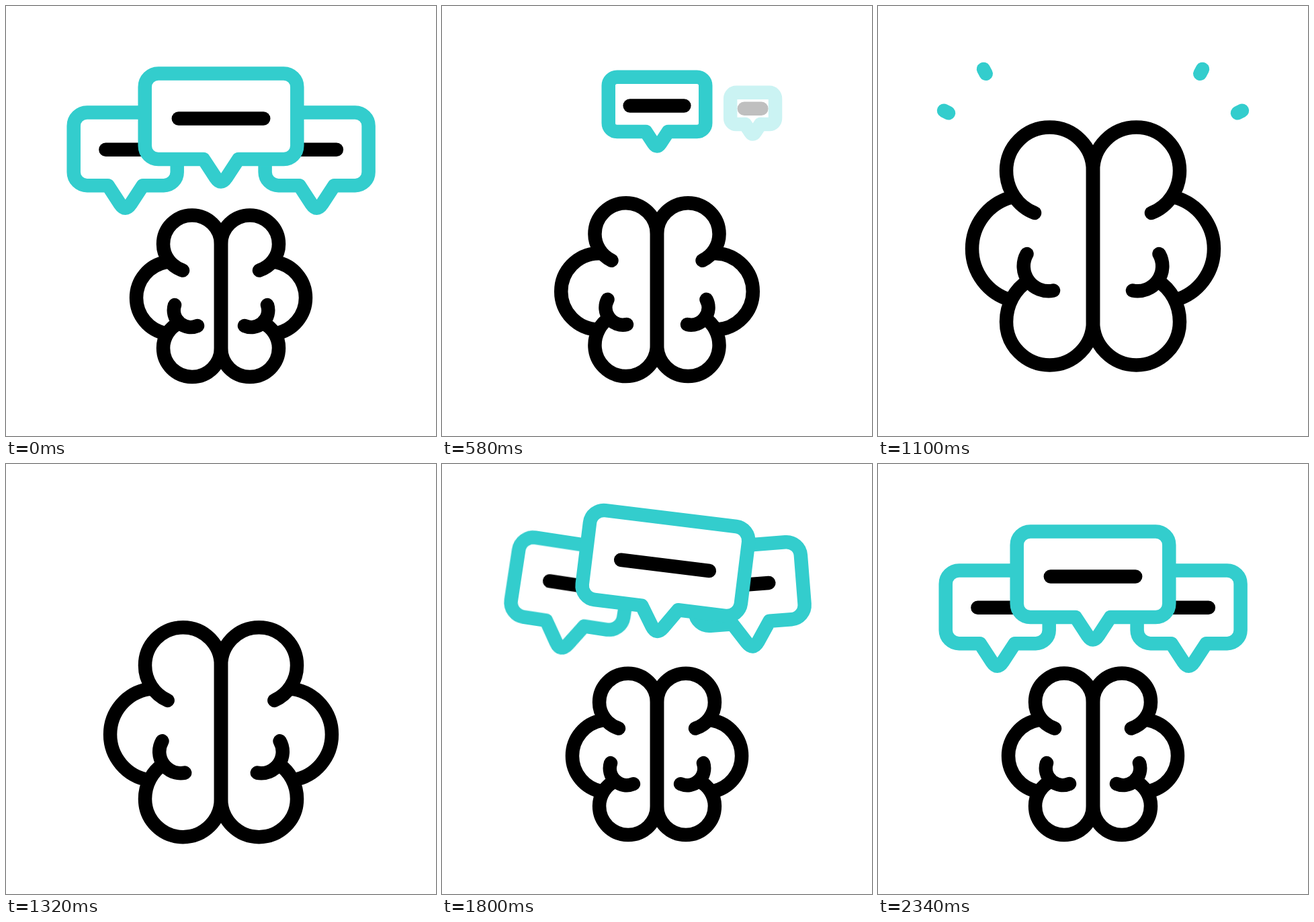
An HTML page that plays this animation: 640 by 640 pixels, repeating every 2.62 s.

```html
<!DOCTYPE html>
<html lang="en">
<head>
<meta charset="utf-8">
<title>Brain and speech bubbles</title>
<style>
  html, body { margin: 0; width: 100%; height: 100%; overflow: hidden; background: #fff; }
  svg { display: block; width: 100vw; height: 100vh; }
  path { fill: none; stroke: #000; stroke-width: 20.5; stroke-linecap: round; stroke-linejoin: round; vector-effect: non-scaling-stroke; }
  .teal { stroke: #33cdcd; }
  .box { fill: #fff; }
</style>
</head>
<body>
<svg viewBox="0 0 640 640">
  <defs>
    <path id="half"/>
    <g id="burst"><path class="teal"/><path class="teal"/></g>
  </defs>
  <use href="#half"/>
  <use href="#half" transform="matrix(-1 0 0 1 640 0)"/>
  <g id="rays">
    <use href="#burst"/>
    <use href="#burst" transform="matrix(-1 0 0 1 640 0)"/>
  </g>
  <g id="bubbles"></g>
</svg>
<script>
const LOOP = 2620, STEP = 20;
const $ = id => document.getElementById(id);
const clamp = x => Math.min(1, Math.max(0, x));

// Eased step from 0 to 1, and a smooth bump of height 1.
const ramp = (t, from, to) => {
  const u = clamp((t - from) / (to - from));
  return u * u * (3 - 2 * u);
};
const bump = (t, at, width) => Math.cos(Math.PI / 2 * Math.min(1, Math.abs(t - at) / width)) ** 2;

function drawBrain(t) {
  const drop = bump(t, 420, 200) + 1.2 * bump(t, 1400, 200) + 0.3 * bump(t, 2020, 200);
  const bulge = bump(t, 520, 240) + bump(t, 1440, 240) + 0.9 * bump(t, 2020, 240);
  const size = ramp(t, 450, 860) - ramp(t, 1180, 1550) - 0.1 * bulge;
  const mix = (small, large) => small + (large - small) * size;

  const bottom = mix(552, 534.5) + 18 * drop;
  const top = bottom - mix(240.5, 354);
  const r = mix(43, 64.5), cx = 320 - r, left = cx - r;
  const upper = top + r, lower = bottom - r;

  // end of the top lobe, start and end of the inner fold
  const ex = 320 - mix(57, 87) - 7 * bulge, ey = top + mix(82, 127.5) - 4 * bulge;
  const ax = 320 - mix(69, 98.5), ay = top + mix(133.5, 188.5) + 2 * bulge;
  const bx = 320 - mix(35, 59) - 7.5 * bulge, by = top + mix(164.5, 243) + 5 * bulge;

  // the bottom lobe meets the fold at its middle
  const dx = bx - ax, dy = by - ay, fold = 0.55 * Math.hypot(dx, dy);
  const jx = (ax + bx) / 2 - 0.321 * dy, jy = (ay + by) / 2 + 0.321 * dx;

  // side lobe: a circle through both joints and the outermost point
  const side = 320 - mix(126, 180) - 10 * bulge;
  const sx = cx - 0.9 * r, sy = upper + 0.62 * r, ty = lower - 0.5 * r;
  const w = sx - side, h = (ty - sy) / 2, R = (w * w + h * h) / (2 * w);

  // vertical radius of an ellipse around (cx, cy) that passes through (x, y)
  const reach = (x, y, cy) => Math.abs(y - cy) / Math.sqrt(1 - ((x - cx) / r) ** 2);

  $('half').setAttribute('d', `M320 ${lower}V${upper}A${r} ${r} 0 0 0 ${left} ${upper}`
    + `A${r} ${reach(ex, ey, upper)} 0 0 0 ${ex} ${ey}`
    + `M${sx} ${sy}A${R} ${R} 0 ${w > R ? 1 : 0} 0 ${sx} ${ty}`
    + `M320 ${lower}A${r} ${r} 0 0 1 ${left} ${lower}`
    + `A${r} ${reach(jx, jy, lower)} 0 0 1 ${jx} ${jy}`
    + `M${ax} ${ay}A${fold} ${fold} 0 0 0 ${bx} ${by}`);
}

function drawRay(path, x, y, angle, from, to) {
  const dx = -Math.cos(angle), dy = -Math.sin(angle);
  path.setAttribute('d', `M${x + dx * from} ${y + dy * from}L${x + dx * to} ${y + dy * to}`);
}

function drawRays(t) {
  const from = 73 * ramp(t, 740, 1220) - 11.4;
  const to = 56 * ramp(t, 740, 860) + 14 * ramp(t, 860, 1060) - 12;
  const [steep, flat] = $('burst').children;
  drawRay(steep, 184.5, 145, 1.077, from, to);
  drawRay(flat, 150, 181.5, 0.459, from, to);
  $('rays').setAttribute('opacity', Math.min(clamp((t - 740) / 60), clamp((1220 - t) / 80)));
}

// A bubble is drawn around the tip of its tail; w and line are half widths.
function makeBubble(x, y, w, top, line, lineY, leave, enter, side) {
  const node = document.createElementNS('http://www.w3.org/2000/svg', 'g');
  const e = w - 20, h = -73.5 - top;
  node.innerHTML = `<path class="teal box" d="M-26 -33.5H${-e}a20 20 0 0 1 -20 -20v${-h}`
    + `a20 20 0 0 1 20 -20H${e}a20 20 0 0 1 20 20v${h}a20 20 0 0 1 -20 20H26`
    + `L8 -6Q0 6 -8 -6Z"/><path d="M${-line} ${lineY}H${line}"/>`;
  $('bubbles').append(node);
  return { node, x, y, leave, enter, side };
}

const makeSide = (x, leave, enter, side) =>
  makeBubble(x, 300.7, 77, -142.2, 29.3, -87, leave, enter, side);
const bubbles = [
  makeSide(177.7, 220, 1520, 1),
  makeSide(462.6, 280, 1580, -1),
  makeBubble(320, 261.5, 113.3, -161, 63.2, -94, 340, 1450, 1)
];

function drawBubble(b, t) {
  let scale, shift, turn = 0, opacity;
  if (t < b.enter) {
    const u = clamp((t - b.leave) / 320);
    scale = 1 - 0.644 * u ** 2;
    shift = -136 * u ** 3.27;
    opacity = clamp((1 - u) * 4);
  } else {
    const s = t - b.enter, grow = ramp(s, 0, 180);
    scale = 0.4 + 0.6 * grow + 0.1 * bump(s, 280, 140);
    shift = 21 * (1 - grow) - 30 * bump(s, 240, 200);
    turn = b.side * (12.5 * (ramp(s, 60, 180) - 1) + 9 * bump(s, 300, 160) - 9 * bump(s, 535, 105));
    opacity = clamp(s / 80);
  }
  b.node.setAttribute('transform',
    `translate(${b.x} ${b.y + shift}) rotate(${turn}) scale(${scale})`);
  b.node.setAttribute('opacity', opacity);
}

function draw(t) {
  drawBrain(t);
  drawRays(t);
  bubbles.forEach(b => drawBubble(b, t));
}

const start = performance.now();
function tick() {
  const t = (performance.now() - start) % LOOP;
  draw(Math.floor(t / STEP) * STEP);
  requestAnimationFrame(tick);
}
tick();
</script>
</body>
</html>
```
